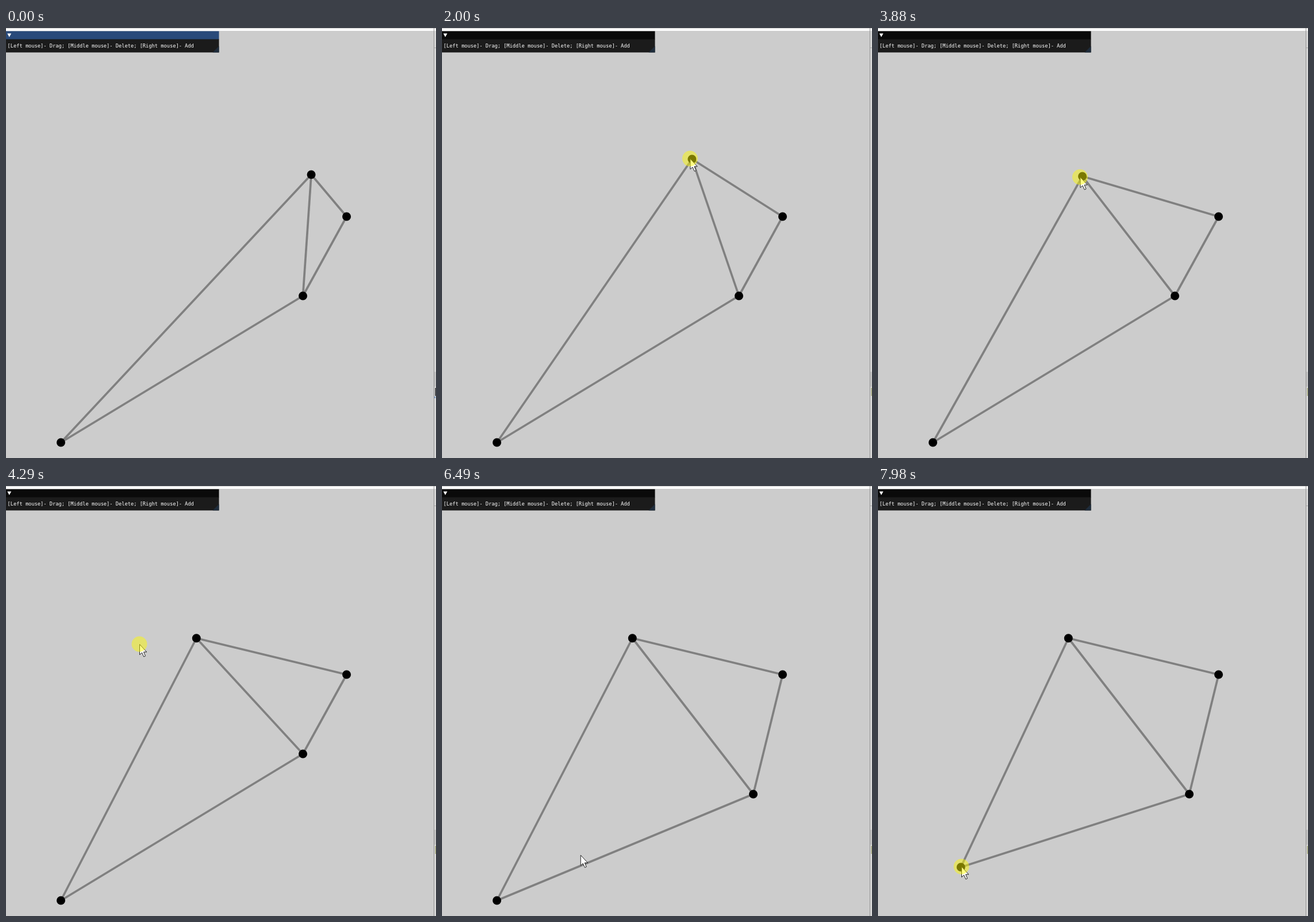
Animation of 748 by 748 pixels, one loop 8 s. Source, as an HTML page with a canvas:

```html
<!DOCTYPE html>
<html>
<head>
<meta charset="utf-8">
<style>
html, body { margin: 0; height: 100%; overflow: hidden; background: #ccc; }
canvas { display: block; }
</style>
</head>
<body>
<canvas id="stage" width="748" height="748"></canvas>
<script>
const ctx = document.getElementById('stage').getContext('2d');
const LOOP = 8000;
const LAG = 10;
const ENTER = 260;
const FIRST_PRESS = 1450;

// Hand movements: eased from the previous end to `to`, curved towards `bend`
const moves = [
  { start: ENTER, end: 1050, to: [539, 237], bend: [415, 235] },
  { start: 1070, end: 1270, to: [533, 251] },
  { start: 1550, end: 2460, to: [321, 196], bend: [433, 230] },
  { start: 2750, end: 3280, to: [444, 242] },
  { start: 3280, end: 3460, to: [431, 226] },
  { start: 3570, end: 4290, to: [232, 275], bend: [331, 279] },
  { start: 4440, end: 4950, to: [550, 490] },
  { start: 4950, end: 5150, to: [517, 468] },
  { start: 5380, end: 6130, to: [566, 604] },
  { start: 6310, end: 6590, to: [110, 715], bend: [338, 558] },
  { start: 6590, end: 7200, to: [101, 719.5], bend: [66, 735] },
  { start: 7660, end: 8020, to: [146.5, 660] }
];

// Button held; the dragged node stays behind once the pointer slips off it
const presses = [
  { from: FIRST_PRESS, to: 2560, node: 0, slip: 2012 },
  { from: 3570, to: 4435, node: 0, slip: 3940 },
  { from: 5360, to: 6305, node: 2, slip: 5765 },
  { from: 7480, to: LOOP, node: 3, slip: LOOP }
];
const startNodes = [[531, 255], [592.5, 328], [516.5, 466], [95.5, 721]];
const edges = [[0, 1], [0, 2], [0, 3], [1, 2], [2, 3]];

const ease = u => u * u * (3 - 2 * u);

function pointer(t) {
  let at = [672, 750];
  for (const { start, end, to, bend } of moves) {
    if (t < start) break;
    const s = ease(Math.min(1, (t - start) / (end - start)));
    at = at.map((a, k) => {
      const b = bend ? bend[k] : (a + to[k]) / 2;
      return (1 - s) ** 2 * a + 2 * s * (1 - s) * b + s * s * to[k];
    });
  }
  return at;
}

function rect(color, x, y, w, h) {
  ctx.fillStyle = color;
  ctx.fillRect(x, y, w, h);
}

function disc(color, [x, y], r) {
  ctx.fillStyle = color;
  ctx.beginPath();
  ctx.arc(x, y, r, 0, 2 * Math.PI);
  ctx.fill();
}

function polygon(color, ...points) {
  ctx.fillStyle = color;
  ctx.beginPath();
  points.forEach(([x, y]) => ctx.lineTo(x, y));
  ctx.closePath();
  ctx.fill();
}

function drawGraph(nodes) {
  ctx.strokeStyle = '#808080';
  ctx.lineWidth = 3.7;
  for (const [a, b] of edges) {
    ctx.beginPath();
    ctx.moveTo(...nodes[a]);
    ctx.lineTo(...nodes[b]);
    ctx.stroke();
  }
  nodes.forEach(n => disc('#000', n, 7.5));
}

function drawFrame(touched) {
  rect('#fff', 0, 0, 748, 5);
  rect('#ccc', 0, 0, 748, 1);
  rect('#d8d8d8', 745, 5, 3, 743);
  rect('#909090', 744, 0, 1, 748);
  rect('#aaa', 745, 34, 3, 1);
  rect('#c4c4c4', 745, 598, 3, 26);
  rect(touched ? '#a3a77a' : '#333', 746.5, 626, 1.5, 14);
  if (!touched) rect('#7f9fc8', 745, 641, 2, 3);
}

function drawPanel(active) {
  rect('#1b1b1b', 0, 19, 370.5, 23.5);
  rect(active ? '#294a7a' : '#0a0a0a', 0, 5.5, 370.5, 14);
  polygon('#1e2c3b', [370.5, 31.5], [370.5, 42.5], [359.5, 42.5]);
  polygon('#fff', [2.3, 9.5], [9.2, 9.5], [5.7, 15.7]);
  ctx.fillStyle = '#fff';
  ctx.font = '8.7px "DejaVu Sans Mono", monospace';
  ctx.fillText('[Left mouse]- Drag; [Middle mouse]- Delete; [Right mouse]- Add', 2.5, 34);
}

function drawPointer([x, y]) {
  ctx.save();
  ctx.translate(x + 0.5, y + 0.5);
  polygon('#fff', [0, 0], [0, 18], [4, 14.4], [7.2, 21.5], [10, 20.3], [7, 13.3], [12.3, 13.3]);
  ctx.strokeStyle = '#222';
  ctx.lineWidth = 1;
  ctx.stroke();
  ctx.restore();
}

function draw() {
  const t = performance.now() % LOOP;
  const touched = t >= FIRST_PRESS;
  const nodes = startNodes.slice();
  for (const p of presses) {
    if (t >= p.from) nodes[p.node] = pointer(Math.min(t, p.slip) - LAG);
  }
  rect('#ccc', 0, 0, 748, 748);
  drawGraph(nodes);
  drawFrame(touched);
  drawPanel(!touched);
  if (t >= ENTER) {
    const tip = pointer(t);
    drawPointer(tip);
    if (presses.some(p => t >= p.from && t < p.to)) disc('rgba(255,250,0,.48)', tip, 13.5);
  }
  requestAnimationFrame(draw);
}
draw();
</script>
</body>
</html>
```
